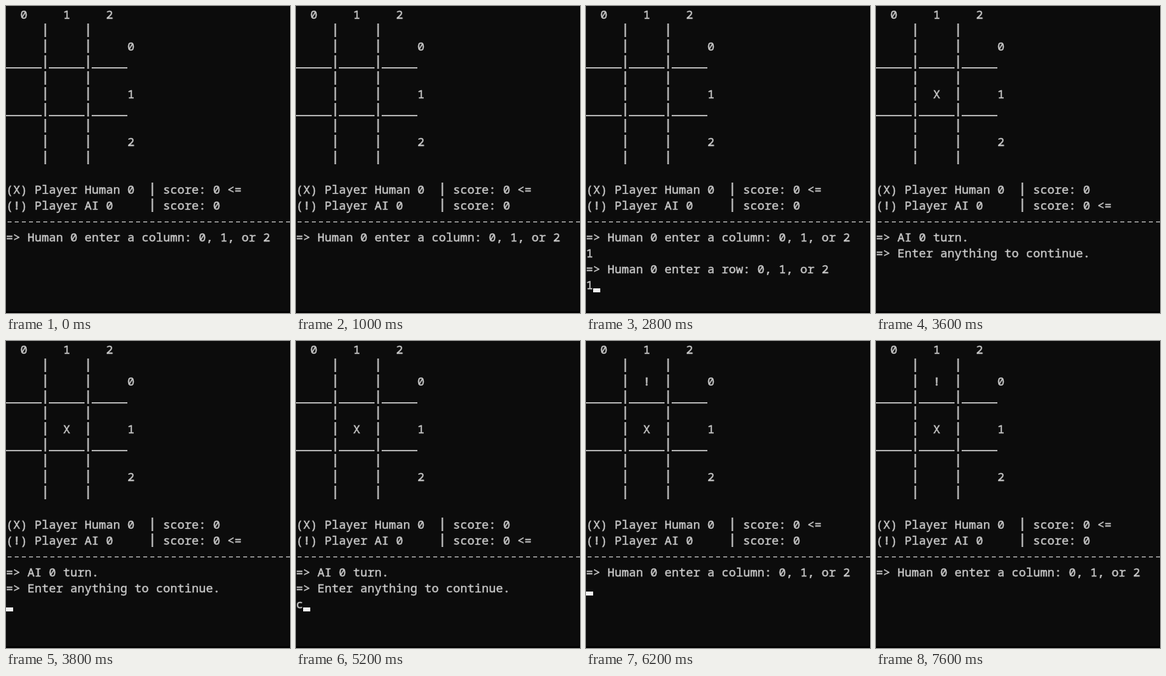
Animation, 358 px wide and 386 px high, one loop 8 s. Source, as an HTML page:

```html
<!DOCTYPE html>
<html lang="en">
<head>
<meta charset="utf-8">
<title>Console tic-tac-toe</title>
<style>
  html, body { margin: 0; width: 100%; height: 100%; overflow: hidden; background: #000; }
  svg { display: block; }
  text {
    font: 15px "Noto Sans Mono", "DejaVu Sans Mono", monospace;
    font-variant-ligatures: none;
    white-space: pre;
    fill: #ccc;
    stroke: #ccc;
    stroke-width: .35px;
  }
</style>
</head>
<body>
<svg id="stage" width="358" height="386" viewBox="0 0 358 386">
  <rect width="357" height="384" fill="#0c0c0c"/>
  <g id="screen"></g>
  <rect id="cursor" width="9" height="5" fill="#f2f2f2"/>
</svg>
<script>
const LOOP = 8000, CELL = 9, ROW = 20;
const screen = document.getElementById('screen');
const cursor = document.getElementById('cursor');

// Line-drawing characters: x, y, width and height inside a cell
const STROKES = { '|': [3.6, 2, 1.8, 17], '_': [0, 17, 9, 1.5], '-': [2, 11, 5, 1] };

function board(top, middle) {
  const bars = '     |     |';
  const floor = '_____|_____|_____';
  const cells = (mark, n) => `     |  ${mark}  |     ${n}`;
  return ['  0     1     2', bars, cells(top, 0), floor,
    bars, cells(middle, 1), floor, bars, cells(' ', 2), bars, ''];
}

function page(top, middle, turn, ...lines) {
  const arrow = n => turn === n ? ' <=' : '';
  return [...board(top, middle),
    '(X) Player Human 0  | score: 0' + arrow(0),
    '(!) Player AI 0     | score: 0' + arrow(1),
    '-'.repeat(40), ...lines];
}

const askColumn = '=> Human 0 enter a column: 0, 1, or 2';
const askRow = '=> Human 0 enter a row: 0, 1, or 2';
const aiTurn = ['=> AI 0 turn.', '=> Enter anything to continue.'];

const pages = {
  column: page(' ', ' ', 0, askColumn, ''),
  columnTyped: page(' ', ' ', 0, askColumn, '1'),
  row: page(' ', ' ', 0, askColumn, '1', askRow, ''),
  rowTyped: page(' ', ' ', 0, askColumn, '1', askRow, '1'),
  ai: page(' ', 'X', 1, ...aiTurn, ''),
  aiTyped: page(' ', 'X', 1, ...aiTurn, 'c'),
  blank: [''],
  next: page('!', 'X', 0, askColumn, '')
};

// Start time, page, cursor visible
const steps = [
  [0, 'column', 0], [200, 'column', 1], [800, 'column', 0], [1200, 'column', 1],
  [1600, 'columnTyped', 1], [2000, 'row', 1], [2200, 'row', 0],
  [2800, 'rowTyped', 1], [3200, 'ai', 1], [3400, 'ai', 0], [3800, 'ai', 1],
  [4400, 'ai', 0], [5000, 'ai', 1], [5200, 'aiTyped', 1], [5800, 'blank', 1],
  [6000, 'next', 1], [6600, 'next', 0], [7000, 'next', 1], [7600, 'next', 0]
];

function add(tag, attrs, text = '') {
  const el = document.createElementNS('http://www.w3.org/2000/svg', tag);
  for (const key in attrs) el.setAttribute(key, attrs[key]);
  el.textContent = text;
  screen.append(el);
}

function drawLine(line, row) {
  const y = row * ROW;
  [...line].forEach((char, col) => {
    if (!STROKES[char]) return;
    const [dx, dy, width, height] = STROKES[char];
    add('rect', { x: col * CELL + dx, y: y + dy, width, height, fill: '#ccc' });
  });
  // Words are placed on the character grid
  for (const word of line.matchAll(/[^\s|_-]+/g))
    add('text', { x: word.index * CELL, y: y + 16 }, word[0]);
}

function show([, name, visible]) {
  const lines = pages[name];
  const last = lines.length - 1;
  screen.replaceChildren();
  lines.forEach(drawLine);
  cursor.setAttribute('x', lines[last].length * CELL);
  cursor.setAttribute('y', last * ROW + 15);
  cursor.setAttribute('opacity', visible);
}

let current;
const start = performance.now();

function tick() {
  const time = (performance.now() - start) % LOOP;
  const step = steps.findLast(([at]) => at <= time);
  if (step !== current) show(current = step);
  requestAnimationFrame(tick);
}
tick();
</script>
</body>
</html>
```
